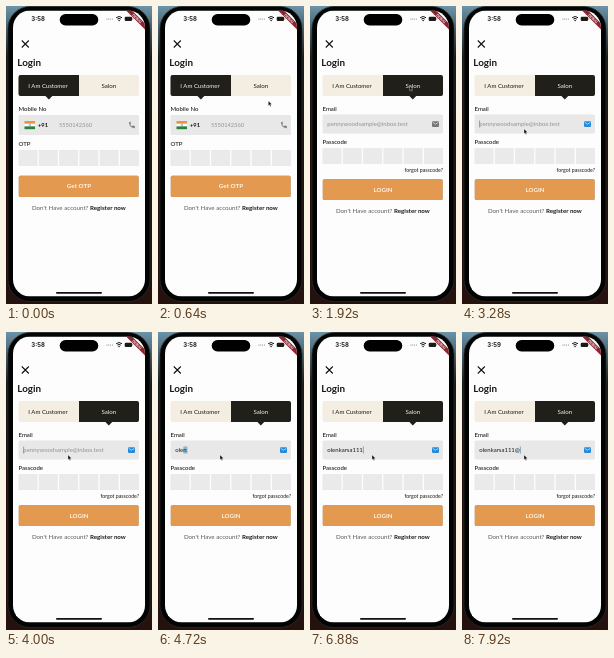
Write an HTML page that moves like this. It is 146 px wide and 298 px high and loops after 8000 ms.

```html
<!DOCTYPE html>
<html lang="en">
<head>
<meta charset="utf-8">
<title>Login screen</title>
<style>
html, body { margin: 0; width: 100%; height: 100%; overflow: hidden; background: #111; }
svg { display: block; width: 100vw; height: 100vh; font: 6px Lato, sans-serif; fill: #1c1a18; }
.mid { text-anchor: middle; }
.end { text-anchor: end; }
.bold { font-weight: 700; }
.hint { fill: #929296; }
.label { font-size: 6px; font-weight: 500; }
.button { fill: #e39a50; filter: drop-shadow(0 .3px .5px #0007); }
</style>
</head>
<body>
<svg viewBox="0 0 146 298">
  <defs>
    <linearGradient id="wall" x2="0" y2="1">
      <stop offset="0" stop-color="#6d93a6"/>
      <stop offset=".06" stop-color="#4d6c7b"/>
      <stop offset=".17" stop-color="#171b1e"/>
      <stop offset=".45" stop-color="#24110e"/>
      <stop offset="1" stop-color="#25120f"/>
    </linearGradient>
    <clipPath id="screen"><rect x="7" y="4.5" width="132" height="286" rx="17"/></clipPath>
  </defs>
  <rect width="146" height="298" fill="url(#wall)"/>
  <rect x="2" y=".5" width="142" height="295" rx="22" fill="#020303" stroke="#2b2b2c" stroke-width=".7"/>
  <g clip-path="url(#screen)">
    <rect x="7" y="4.5" width="132" height="286" fill="#fdfdfd"/>
    <g transform="translate(139 4.5) rotate(45)">
      <rect x="-24" y="9.2" width="48" height="4.2" fill="#8d2430"/>
      <text class="mid bold" y="12.5" font-size="3.4" fill="#fff">DEBUG</text>
    </g>
  </g>
  <rect x="53.7" y="8" width="38.6" height="11.5" rx="5.75" fill="#000"/>

  <text id="clock" class="bold" x="25.3" y="15" font-size="6" font-family="Inter, sans-serif"></text>
  <g id="signal"></g>
  <path d="M110.2 11.7q2.9-2.4 5.8 0M111.4 13.1q1.7-1.4 3.4 0" fill="none" stroke="#111"/>
  <circle cx="113.1" cy="14.5" r=".8"/>
  <rect x="118.7" y="10.7" width="7.4" height="4.2" rx="1.2"/>
  <path d="M126.8 12v1.6" stroke="#777" stroke-width=".6"/>
  <path d="M15.8 34.5l7 7m0-7l-7 7" stroke="#111" stroke-width="1.1"/>
  <text class="bold" x="11.3" y="60.3" font-size="9.9">Login</text>

  <rect x="12.5" y="69" width="120.5" height="21" rx="2" fill="#f4ede2"/>
  <path id="tab" fill="#201f19"/>
  <text id="customer" class="mid" x="42" y="81.7">I Am Customer</text>
  <text id="salon" class="mid" x="102.9" y="81.7" font-size="6.2">Salon</text>

  <g id="phoneForm">
    <text class="label" x="12.5" y="105.2">Mobile No</text>
    <rect x="12.5" y="109" width="120.5" height="20" rx="1.5" fill="#e8e8e8"/>
    <path d="M18.5 115h10.5v2.8H18.5z" fill="#ef9337"/>
    <path d="M18.5 117.8h10.5v2.6H18.5z" fill="#fff"/>
    <path d="M18.5 120.4h10.5v2.8H18.5z" fill="#28823d"/>
    <circle cx="23.8" cy="119.1" r=".9" fill="none" stroke="#42539b" stroke-width=".4"/>
    <text class="bold" x="32" y="121.3" font-size="5.8">+91</text>
    <text class="hint" x="53" y="121.3" font-size="5.7">5550142360</text>
    <path d="M123.2 116.4q.5 5 5.3 5.6l.2-1.8-1.8-.4-.9.8q-1.5-.7-2-2l.8-.9-.4-1.8z" fill="#77777a" stroke="#77777a" stroke-width=".4"/>
    <text class="label" x="12.5" y="140.2">OTP</text>
    <g class="boxes" transform="translate(0 144)"></g>
    <rect class="button" x="12.8" y="169.7" width="119.8" height="21.4" rx="1.5"/>
    <text class="mid bold" x="73" y="182.4" font-size="6.3" fill="#fff4e4">Get OTP</text>
    <text class="mid" x="72.9" y="203.8" font-size="6.2" fill="#5c5a56">Don't Have account? <tspan class="bold" fill="#1c1a18">Register now</tspan></text>
  </g>

  <g id="mailForm">
    <text class="label" x="12.5" y="104.8">Email</text>
    <rect x="12.5" y="108.5" width="120.5" height="19" rx="1.5" fill="#e8e8e8"/>
    <rect id="caret" y="114.5" height="7"/>
    <text id="mail" x="17.3" y="120"></text>
    <rect id="letter" x="122" y="115.3" width="7" height="5.6" rx=".8"/>
    <path d="M122.6 116.2l2.9 2.1 2.9-2.1" fill="none" stroke="#e8e8e8" stroke-width=".7"/>
    <text class="label" x="12.5" y="137.7">Passcode</text>
    <g class="boxes" transform="translate(0 142)"></g>
    <text class="end" x="133" y="166.2" font-size="5.2">forgot passcode?</text>
    <rect class="button" x="12.8" y="173.2" width="119.8" height="20.8" rx="1.5"/>
    <text class="mid bold" x="73" y="186" font-size="6.1" fill="#fff4e4">LOGIN</text>
    <text class="mid" x="72.9" y="207.3" font-size="6.2" fill="#5c5a56">Don't Have account? <tspan class="bold" fill="#1c1a18">Register now</tspan></text>
  </g>
  <rect x="50" y="286" width="46" height="1.7" rx=".85" fill="#111"/>
  <path id="cursor" d="M0 0v4.7l1.1-1 .8 1.7.9-.4-.8-1.6 1.5-.1z" fill="#111" stroke="#fff" stroke-width=".3"/>
</svg>
<script>
const $ = id => document.getElementById(id);
const repeat = (count, make) => Array.from({ length: count }, (_, i) => make(i)).join('');
const boxes = repeat(6, i => `<rect x="${12.5 + i * 20.3}" width="19" height="16" rx=".6" fill="#eaeaeb"/>`);
document.querySelectorAll('.boxes').forEach(g => g.innerHTML = boxes);
$('signal').innerHTML = repeat(4, i => `<circle cx="${101 + i * 1.8}" cy="13" r=".55" fill="#777"/>`);

const LOOP = 8000, SWITCH = 1840, FOCUS = 2960;
const DARK = '#1c1a18', LIGHT = '#f6f1e8', GREY = '#929296';
const typed = 'olenkarsa111@';
const keys = [4040, 4240, 4440, 4640, 4960, 5200, 5440, 5640, 5840, 6320, 6520, 6720, 7360];
const path = [[80, 150, 150], [880, 99.5, 80], [2420, 99.5, 80], [2800, 62, 123], [LOOP, 62, 123]];

function pointAt(t) {
  const i = Math.max(1, path.findIndex(p => t < p[0]));
  const [a, b] = [path[i - 1], path[i]];
  const u = Math.max(0, (t - a[0]) / (b[0] - a[0]));
  const ease = u * u * (3 - 2 * u);
  return [1, 2].map(k => a[k] + (b[k] - a[k]) * ease);
}

function draw(t) {
  const salon = t >= SWITCH, focused = t >= FOCUS;
  $('phoneForm').style.display = salon ? 'none' : '';
  $('mailForm').style.display = salon ? '' : 'none';
  $('tab').setAttribute('d', salon
    ? 'M73 69h58q2 0 2 2v17q0 2-2 2h-24.8l-3.4 3.6-3.4-3.6H73z'
    : 'M73 69H14.5q-2 0-2 2v17q0 2 2 2h25l3.4 3.6 3.4-3.6H73z');
  $('customer').style.fill = salon ? DARK : LIGHT;
  $('salon').style.fill = salon ? LIGHT : DARK;
  $('clock').textContent = t < 6960 ? '3:58' : '3:59';

  const count = keys.filter(k => k <= t).length;
  const mail = $('mail');
  mail.textContent = count ? typed.slice(0, count) : 'pennywoodsample@inbox.test';
  mail.style.fill = count ? DARK : GREY;
  $('letter').style.fill = focused ? '#298bd8' : '#77777a';

  // The newest letter stays marked until the word is complete.
  const end = count ? mail.getComputedTextLength() : 0;
  const marked = count > 1 && t < 6160;
  const start = marked ? mail.getSubStringLength(0, count - 1) : end;
  const caret = $('caret');
  caret.setAttribute('x', 17.3 + start);
  caret.setAttribute('width', marked ? end - start + .8 : .8);
  caret.style.fill = marked ? '#83b8d6' : '#4b9bcf';
  caret.style.opacity = focused ? 1 : 0;
  $('cursor').setAttribute('transform', `translate(${pointAt(t)})`);
}

function tick() {
  draw(performance.now() % LOOP);
  requestAnimationFrame(tick);
}
tick();
</script>
</body>
</html>
```
